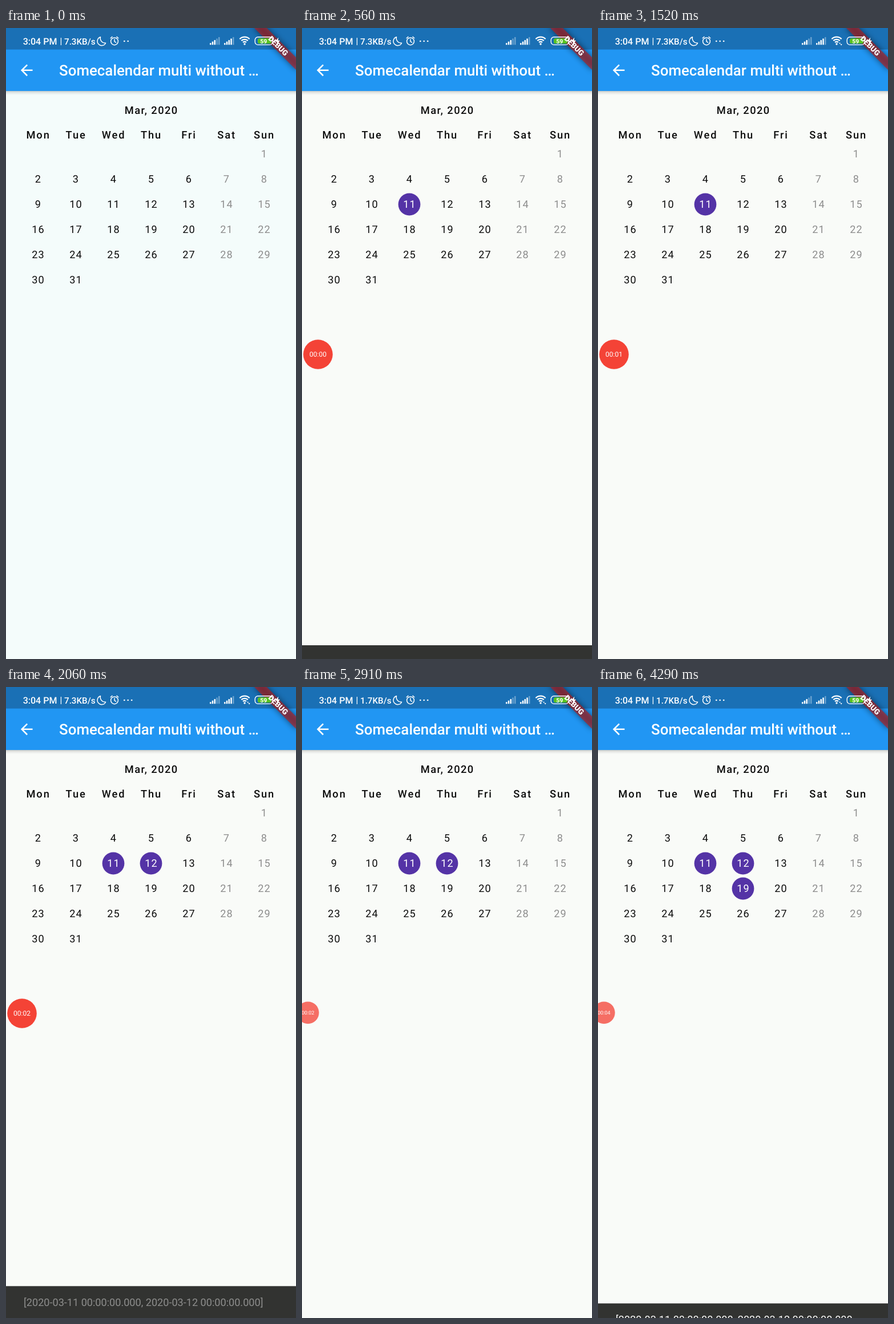
Recreate the animation shown at these times as an HTML page. Size 508 px wide and 1102 px high, loop 4350 ms.

```html
<!DOCTYPE html>
<html lang="en">
<head>
<meta charset="utf-8">
<title>Calendar multi select</title>
<style>
  html, body { margin: 0; width: 100%; height: 100%; overflow: hidden; background: #f9fbf8; }
  svg { display: block; width: 100vw; height: 100vh; }
  text { font-family: Roboto, "Noto Sans", sans-serif; white-space: pre; text-rendering: geometricPrecision; }
  .mid { text-anchor: middle; }
  .head { font-size: 18.3px; font-weight: 500; fill: #0c0c0c; }
  .day { font-size: 18.1px; letter-spacing: 1px; fill: #0c0c0c; }
  .off { fill: #8d8d8d; }
  .status { font-weight: 500; fill: #fff; }
  .snack { font-size: 18.1px; fill: #fff; }
</style>
</head>
<body>
<svg viewBox="0 0 508 1102" preserveAspectRatio="none">
  <defs>
    <linearGradient id="shade" x1="0" y1="0" x2="0" y2="1">
      <stop offset="0" stop-color="#000" stop-opacity=".2"/>
      <stop offset=".4" stop-color="#000" stop-opacity=".08"/>
      <stop offset="1" stop-color="#000" stop-opacity="0"/>
    </linearGradient>
    <filter id="soft" x="-50%" y="-150%" width="200%" height="400%">
      <feGaussianBlur stdDeviation="5.1"/>
    </filter>
  </defs>

  <rect id="page" width="508" height="1102" fill="#f9fbf8"/>
  <rect y="110" width="508" height="7" fill="url(#shade)"/>
  <rect width="508" height="110" fill="#2196f3"/>
  <rect width="508" height="37.6" fill="#1a70b5"/>
  <path transform="translate(20.7 58.3) scale(1.293)" fill="#fff"
        d="M20 11H7.83l5.59-5.59L12 4l-8 8 8 8 1.41-1.41L7.83 13H20z"/>
  <text x="93.1" y="83" font-size="25.87" font-weight="500" fill="#fff">Somecalendar multi without …</text>

  <g id="calendar">
    <text class="head mid" x="254.7" y="149.8" letter-spacing="1.45">Mar, 2020</text>
  </g>

  <g id="snack">
    <rect width="508" height="90" fill="#323331"/>
    <text class="snack" x="31" y="34.7"></text>
    <text class="snack" x="31" y="55.4"></text>
  </g>

  <g transform="translate(508 0) rotate(45)">
    <rect x="-51.7" y="36.2" width="103.4" height="15.5" opacity=".5" filter="url(#soft)"/>
    <rect x="-51.7" y="36.2" width="103.4" height="15.5" fill="#b71c1c" fill-opacity=".627"/>
  </g>

  <g id="statusbar">
    <text class="status" x="29.7" y="28.6" font-size="16">3:04 PM</text>
    <text class="status" x="94.6" y="28" font-size="15.3">|</text>
    <text class="status" id="speed" x="102" y="28.6" font-size="15.2"></text>
    <g fill="none" stroke="#fff" stroke-width="1.5" stroke-linecap="round" stroke-linejoin="round">
      <path d="M165.5 15.8A7.6 7.6 0 1 0 174.6 26.2A8.4 8.4 0 0 1 165.5 15.8Z"/>
      <circle cx="190" cy="23.3" r="6.4"/>
      <path d="M190 19.8V23.6L192.6 25.2M183.2 17.8L186 15.4M196.8 17.8L194 15.4"/>
    </g>
    <g fill="#fff">
      <circle cx="207.3" cy="23" r="1.35"/>
      <circle cx="213.7" cy="23" r="1.35"/>
      <circle id="dot" cx="220.2" cy="23" r="1.35"/>
    </g>
    <g fill="none" stroke="#fff" stroke-width="2.3">
      <path d="M415.1 25.1A4.3 4.3 0 0 1 420.9 25.1M412.3 22.1A8.2 8.2 0 0 1 423.7 22.1M409.4 19.2A12 12 0 0 1 426.6 19.2"/>
    </g>
    <circle cx="418" cy="28" r="1.7" fill="#fff"/>
    <path id="arrows" fill="#fff" d="M422.2 27.5L423.6 25L425 27.5ZM424.6 28L427.6 28L426.1 30.8Z"/>
    <rect x="436.2" y="15.8" width="31" height="13.6" rx="5.2" fill="none" stroke="#fff" stroke-width="1.4"/>
    <rect x="441" y="18" width="24" height="9.3" rx="3.4" fill="#58c322"/>
    <text class="mid" x="451.2" y="26.5" font-size="10.4" font-weight="700" fill="#fff">59</text>
    <path fill="#fff" d="M477.3 16.5L471.4 23.8H475L474 29.3L480 21.8H476.4Z"/>
  </g>
  <text class="mid" transform="translate(508 0) rotate(45)" y="48.6"
        font-size="13.2" font-weight="900" fill="#fff">DEBUG</text>

  <g id="button">
    <circle r="25.8" fill="#f44336"/>
    <text class="mid" id="clock" y="4.4" font-size="12" fill="#fff"></text>
  </g>
</svg>
<script>
const LOOP = 4350;
const $ = id => document.getElementById(id);

function add(parent, tag, attrs, text = '') {
  const el = document.createElementNS('http://www.w3.org/2000/svg', tag);
  for (const k in attrs) el.setAttribute(k, attrs[k]);
  el.textContent = text;
  parent.appendChild(el);
  return el;
}

const colX = i => 56 + 66 * i;
const picks = [];
const pickTimes = { 11: 440, 12: 1760, 19: 3210 };

['Mon', 'Tue', 'Wed', 'Thu', 'Fri', 'Sat', 'Sun'].forEach((name, i) =>
  add($('calendar'), 'text', { class: 'head mid', x: colX(i) + .6, y: 192.6, 'letter-spacing': 1.9 }, name));

for (let d = 1; d <= 31; d++) {
  const col = (d + 5) % 7, x = colX(col), y = 220 + 44 * Math.floor((d + 5) / 7);
  const at = pickTimes[d];
  const disc = at && add($('calendar'), 'circle', { cx: x, cy: y, r: 19.4, fill: '#5433a6' });
  const label = add($('calendar'), 'text',
    { class: 'day mid' + (col > 4 ? ' off' : ''), x: x + .4, y: y + 6.3 }, d);
  if (at) picks.push({ at, disc, label });
}

// Signal strength: x of the first bar, number of lit bars
[[357, 3], [382, 4]].forEach(([x, lit]) => {
  for (let i = 0; i < 5; i++) {
    const h = 3 + 2.6 * i;
    add($('statusbar'), 'rect', { x: x + 3.75 * i, y: 29.3 - h, width: 2.5, height: h,
      fill: '#fff', 'fill-opacity': i < lit ? 1 : .35 });
  }
});

const stamp = d => `2020-03-${d} 00:00:00.000`;
const snacks = [
  { enter: 480, leave: 1250, out: 250, h: 56.9, lines: [`[${stamp(11)}]`, ''] },
  { enter: 1857, leave: 2540, out: 250, h: 56.9, lines: [`[${stamp(11)}, ${stamp(12)}]`, ''] },
  { enter: 3150, leave: 4170, out: 168, h: 77.6, lines: [`[${stamp(11)}, ${stamp(12)},`, `${stamp(19)}]`] }
];
const snackLines = $('snack').querySelectorAll('text');

const clamp = v => Math.min(1, Math.max(0, v));

// cubic-bezier(.4, 0, .2, 1)
function ease(x) {
  if (x <= 0 || x >= 1) return clamp(x);
  let lo = 0, hi = 1, s = .5;
  for (let i = 0; i < 24; i++) {
    s = (lo + hi) / 2;
    const bx = 1.2 * s * (1 - s) ** 2 + .6 * s * s * (1 - s) + s ** 3;
    if (bx < x) lo = s; else hi = s;
  }
  return s * s * (3 - 2 * s);
}

function step(t) {
  const shift = t < 70 ? 0 : t < 260 ? 10 : t < 2130 ? 20 : 30;
  return t < 70 ? 0 : Math.floor((t - shift) / 60) * 60 + shift;
}

function drawSnack(t) {
  const s = snacks.find(s => t >= s.enter && t < s.leave + s.out);
  $('snack').style.display = s ? '' : 'none';
  if (!s) return;
  const p = clamp((t - s.enter) / 250);
  const v = t < s.leave ? p : 1 - (t - s.leave) / s.out;
  $('snack').setAttribute('transform', `translate(0 ${1102 - s.h * ease(v)})`);
  snackLines.forEach((el, i) => {
    el.textContent = s.lines[i];
    el.style.opacity = ease((p - .72) / .28);
  });
}

function drawButton(t) {
  const k = 1 - (1 - clamp((t - 2250) / 260)) ** 3;
  $('button').style.display = t < 190 ? 'none' : '';
  $('button').setAttribute('transform',
    `translate(${28 - 17.6 * k} ${570 - 1.2 * k}) scale(${1 - .25 * k})`);
  $('button').setAttribute('opacity', 1 - .24 * k);
  $('clock').textContent = '00:0' + [980, 1940, 2970, 3930].filter(at => t >= at).length;
}

function draw(t) {
  $('page').setAttribute('fill', t < 130 ? '#f4fcfb' : '#f9fbf8');
  $('dot').style.opacity = t < 130 ? 0 : 1;
  $('arrows').style.display = t < 1220 ? 'none' : '';
  $('speed').textContent = t < 2910 ? '7.3KB/s' : '1.7KB/s';
  for (const { at, disc, label } of picks) {
    disc.style.display = t < at ? 'none' : '';
    label.style.fill = t < at ? '' : '#fff';
  }
  drawSnack(t);
  drawButton(t);
}

let start;
function tick(now) {
  start ??= now;
  draw(step((now - start) % LOOP));
  requestAnimationFrame(tick);
}
draw(0);
requestAnimationFrame(tick);
</script>
</body>
</html>
```
